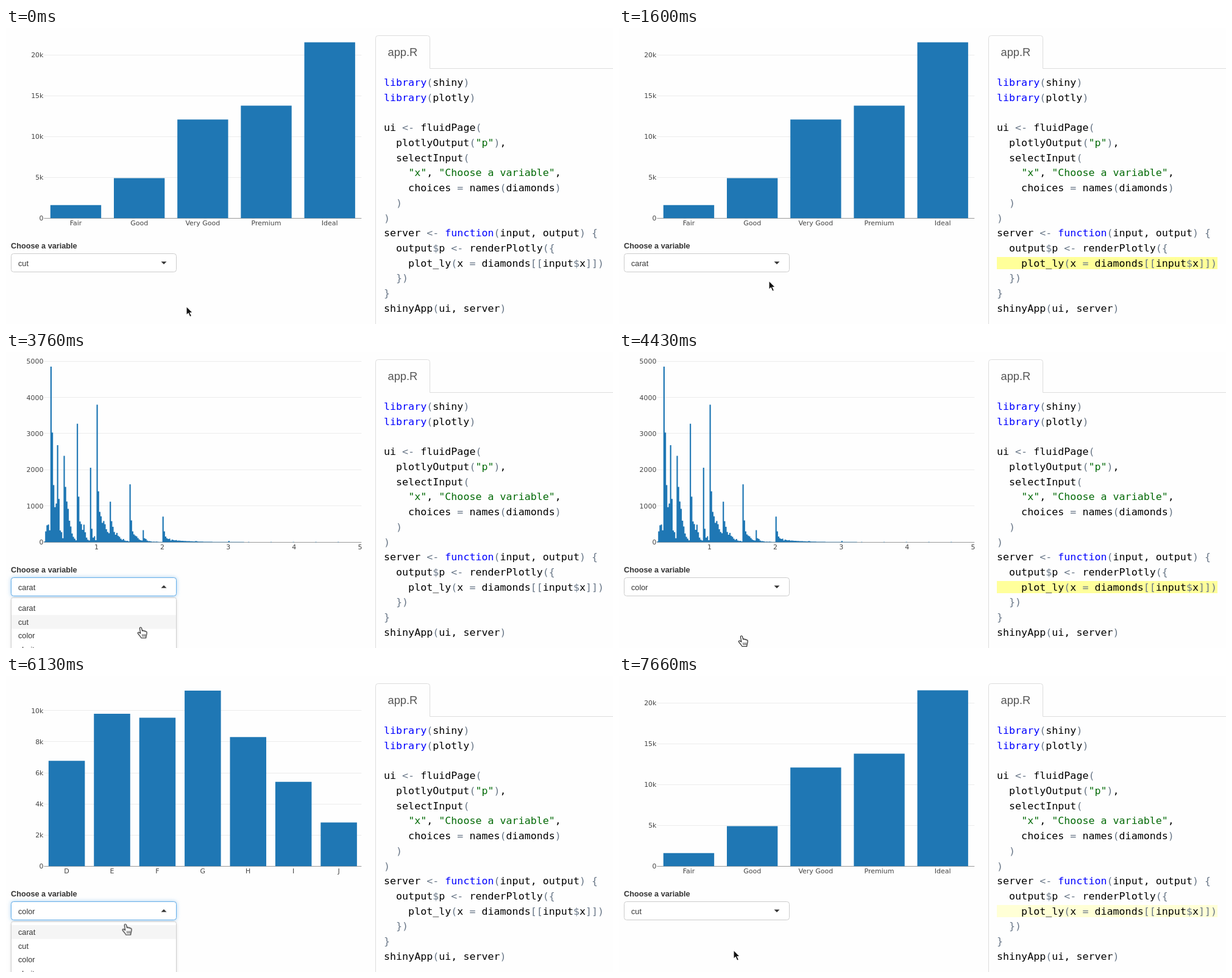
An HTML page that plays this animation: 996 px wide and 486 px high, repeating every 7.7 s.

```html
<!DOCTYPE html>
<html lang="en">
<head>
<meta charset="utf-8">
<title>Choose a variable</title>
<style>
html, body { margin: 0; width: 100%; height: 100%; overflow: hidden; background: #fefefe; }
svg { display: block; width: 996px; height: 486px; }
text { white-space: pre; font: 12.7px "Liberation Sans", Arial, sans-serif; fill: #333; }
.label { font-weight: bold; }
.tab { font-size: 18.3px; fill: #555; }
.code text { font: 16.66px "DejaVu Sans Mono", monospace; fill: #000; }
.key { fill: #00f; }
.str { fill: #036a07; }
.op { fill: #687687; }
.chart text { font: 11px "DejaVu Sans", Verdana, sans-serif; fill: #444; }
.chart path { fill: #1f77b4; }
.grid { stroke: #ececec; }
.zero { stroke: #999; }
.rule { fill: none; stroke: #ddd; }
.box { fill: #fff; stroke: #ccc; }
.focus { fill: #fff; stroke: #66afe9; filter: drop-shadow(0 0 3px rgba(102, 175, 233, .6)); }
.list { fill: #fff; stroke: #d0d0d0; filter: drop-shadow(0 1px 2px rgba(0, 0, 0, .12)); }
.active { fill: #f5f5f5; }

/* hard switches */
.chart, .value, .open, .active, .arrow, .hand { animation: 7.7s step-end infinite; }
#cut { animation-name: cutChart; }
#carat { animation-name: caratChart; }
#color { animation-name: colorChart; }
.v-cut { animation-name: cutValue; }
.v-carat { animation-name: caratValue; }
.v-color { animation-name: colorValue; }
.open { animation-name: open; }
.active { animation-name: active; }
.arrow { animation-name: arrow; }
.hand { animation-name: hand; }
@keyframes cutChart { 0%, 91.56% { visibility: visible } 23.76%, 59.09% { visibility: hidden } 100% { visibility: visible } }
@keyframes caratChart { 0%, 59.09%, 100% { visibility: hidden } 23.76% { visibility: visible } }
@keyframes colorChart { 0%, 91.56%, 100% { visibility: hidden } 59.09% { visibility: visible } }
@keyframes cutValue { 0%, 87.01%, 100% { visibility: visible } 19.48% { visibility: hidden } }
@keyframes caratValue { 0%, 53.25%, 100% { visibility: hidden } 19.48% { visibility: visible } }
@keyframes colorValue { 0%, 87.01%, 100% { visibility: hidden } 53.25% { visibility: visible } }
@keyframes open {
  0%, 19.48%, 53.25%, 87.01%, 100% { visibility: hidden }
  7.79%, 40.2%, 74.55% { visibility: visible }
}
@keyframes active {
  0%, 47.4%, 80.1%, 100% { transform: translateY(22.8px) }
  15.7%, 46.6%, 79% { transform: none }
  49.2% { transform: translateY(45.6px) }
}
@keyframes arrow {
  0%, 19.48%, 87.4%, 100% { visibility: visible }
  6.5%, 39% { visibility: hidden }
}
@keyframes hand {
  0%, 19.48%, 87.4%, 100% { visibility: hidden }
  6.5%, 39% { visibility: visible }
}

/* pointer path */
.pointer { animation: move 7.7s linear infinite; }
@keyframes move {
  0%, .3% { transform: translate(296px, 457px) }
  1.3%, 4.2% { transform: translate(281px, 428px) }
  7.3%, 13.4% { transform: translate(262px, 387px) }
  18.5%, 37.4% { transform: translate(246px, 415px) }
  39.8%, 46.2% { transform: translate(237px, 379px) }
  48.83% { transform: translate(221px, 452px) }
  50.65%, 66.2% { transform: translate(201px, 466px) }
  69.61% { transform: translate(201px, 404px) }
  72%, 77.9% { transform: translate(201px, 379px) }
  82.2%, 100% { transform: translate(188px, 450px) }
}

/* line highlight: flash, then cosine-like fade */
.flash { fill: #ff9; animation: flash 7.7s linear infinite; }
@keyframes flash {
  0%, 20.51% { opacity: 0 }
  20.52% { opacity: 1; animation-timing-function: cubic-bezier(.364, 0, .636, 1) }
  41.3%, 55.44% { opacity: 0 }
  55.45% { opacity: 1; animation-timing-function: cubic-bezier(.364, 0, .636, 1) }
  76.23%, 87.78% { opacity: 0 }
  87.79% { opacity: 1 }
  90.39% { opacity: .962 }
  92.99% { opacity: .854 }
  95.58% { opacity: .691 }
  98.18% { opacity: .5 }
  100% { opacity: .364 }
}
</style>
</head>
<body>
<svg viewBox="0 0 996 486">
  <g class="chart" id="cut"></g>
  <g class="chart" id="carat"></g>
  <g class="chart" id="color"></g>

  <path class="rule" d="M606.5 486V16.500a4 4 0 0 1 4-4h81a4 4 0 0 1 4 4V66.500H996"/>
  <text class="tab" x="626.500" y="46">app.R</text>
  <rect class="flash" x="620" y="376" width="362" height="20"/>
  <g class="code"></g>

  <text class="label" x="8" y="362">Choose a variable</text>
  <rect class="box" x="8.500" y="370.500" width="271" height="30" rx="4"/>
  <path d="M254.500 383.500h9l-4.500 4.500z" fill="#333"/>
  <g class="open">
    <rect class="focus" x="8.500" y="370.500" width="271" height="30" rx="4"/>
    <path d="M254.500 387.500h9l-4.500 -4.500z" fill="#333"/>
    <rect class="list" x="8.500" y="403.500" width="271" height="130" rx="3"/>
    <rect class="active" x="9" y="409" width="270" height="22.800"/>
    <text x="20" y="425">carat</text>
    <text x="20" y="447.500">cut</text>
    <text x="20" y="470">color</text>
    <text x="20" y="493">clarity</text>
  </g>
  <text class="value v-cut" x="20" y="390.500">cut</text>
  <text class="value v-carat" x="20" y="390.500">carat</text>
  <text class="value v-color" x="20" y="390.500">color</text>

  <g class="pointer">
    <path class="arrow" d="M0 0V14.500L3.300 11.500L5.800 17.200L8.500 16L6 10.500H10.400Z" fill="#111" stroke="#fff" stroke-width="1.100"/>
    <g class="hand" stroke="#222" stroke-linejoin="round" stroke-linecap="round">
      <path d="M-1.600 1.500C-1.300-.4 1-.5 1.500 1.200L2.800 6C3.400 4.800 5.100 5 5.500 6.300C6.300 5.400 7.700 5.700 8 7C9 6.400 10.200 7 10.200 8.600C10.300 11.500 9 13.500 8.700 17.500H1C.5 15-3 12.500-4.600 9.800C-5 8.400-3.400 7.500-2.200 8.600L-.2 10Z" fill="#fff" stroke-width="1.200"/>
      <path d="M2.800 11.500l.3 3.500M5.200 11.500v3.500M7.500 11.500l-.2 3.500" fill="none" stroke-width=".9"/>
    </g>
  </g>
</svg>
<script>
const LEFT = 62.4, RIGHT = 583.3, BASE = 312.2;
const find = s => document.querySelector(s);
const label = (x, y, s, anchor) => `<text x="${x}" y="${y}" text-anchor="${anchor}">${s}</text>`;

function axes(step, unit, names) {
  return names.map((name, i) => {
    const y = BASE - i * step * unit;
    const row = Math.floor(y) + .5;
    return `<path class="${i ? 'grid' : 'zero'}" d="M${LEFT} ${row}H${RIGHT}"/>` +
      label(61.5, y + 4, name, 'end');
  }).join('');
}

function bars(id, unit, step, ticks, data) {
  const pitch = (RIGHT - LEFT) / data.length;
  let out = axes(step, unit, ticks);
  data.forEach(([name, n], i) => {
    const mid = LEFT + pitch * (i + .5), w = pitch * .8;
    out += `<path d="M${mid - w / 2} ${BASE}v${-n * unit}h${w}V${BASE}z"/>` +
      label(mid, 324, name, 'middle');
  });
  find(id).innerHTML = out;
}

bars('#cut', .0134, 5000, ['0', '5k', '10k', '15k', '20k'],
  [['Fair', 1610], ['Good', 4906], ['Very Good', 12082], ['Premium', 13791], ['Ideal', 21551]]);
bars('#color', .02553, 2000, ['0', '2k', '4k', '6k', '8k', '10k'],
  [['D', 6775], ['E', 9797], ['F', 9542], ['G', 11292], ['H', 8304], ['I', 5422], ['J', 2808]]);

// carat counts in bins of 0.02, from 0.2
const counts = [
  21, 298, 466, 486, 328, 4853, 3029, 1577, 966, 1068,
  2681, 1194, 322, 277, 108, 2385, 1526, 1121, 922, 592,
  432, 237, 145, 96, 51, 3275, 1256, 571, 502, 342,
  484, 271, 126, 65, 44, 2055, 368, 124, 162, 54,
  3800, 1406, 836, 715, 533, 586, 497, 356, 282, 249,
  1118, 579, 423, 280, 207, 255, 176, 145, 96, 62,
  90, 44, 33, 39, 18, 1600, 601, 298, 215, 178,
  159, 111, 75, 55, 43, 334, 109, 90, 45, 27,
  30, 18, 12, 17, 10, 15, 10, 6, 8, 8,
  705, 299, 153, 110, 86, 95, 46, 70, 59, 50,
  59, 41, 46, 40, 35
];
const UNIT = 108.1, ZERO = 40.4;
const tail = i => {
  const c = .2 + i * .02;
  if (i === 115 || i === 140) return 32;
  if (c < 2.9) return 36 * Math.exp(-(c - 2.3) * 3);
  return i < 152 || i % 17 === 2 ? 8 : 0;
};
let line = `M${LEFT} ${BASE}`;
for (let i = 0; i < 240; i++) {
  const n = i < counts.length ? counts[i] : tail(i);
  const x = Math.max(LEFT, ZERO + (.2 + i * .02) * UNIT);
  line += `H${x.toFixed(1)}V${(BASE - n * .0594).toFixed(1)}`;
}
find('#carat').innerHTML =
  axes(1000, .0594, ['0', 1000, 2000, 3000, 4000, 5000]) +
  `<path d="${line}H${RIGHT}V${BASE}z"/>` +
  [1, 2, 3, 4, 5].map(v => label(ZERO + v * UNIT, 324, v, 'middle')).join('');

const code = `library(shiny)
library(plotly)

ui <- fluidPage(
  plotlyOutput("p"),
  selectInput(
    "x", "Choose a variable",
    choices = names(diamonds)
  )
)
server <- function(input, output) {
  output$p <- renderPlotly({
    plot_ly(x = diamonds[[input$x]])
  })
}
shinyApp(ui, server)`;
const token = /("[^"]*")|\b(library|function)\b|(<-|[=$(){}[\]])/g;
const paint = s => s.replace(token, (t, str, key) =>
  `<tspan class="${str ? 'str' : key ? 'key' : 'op'}">${t.replace('<', '&lt;')}</tspan>`);
find('.code').innerHTML = code.split('\n').map((s, i) =>
  `<text x="620" y="${95 + i * 24.73}">${paint(s)}</text>`).join('');
</script>
</body>
</html>
```
